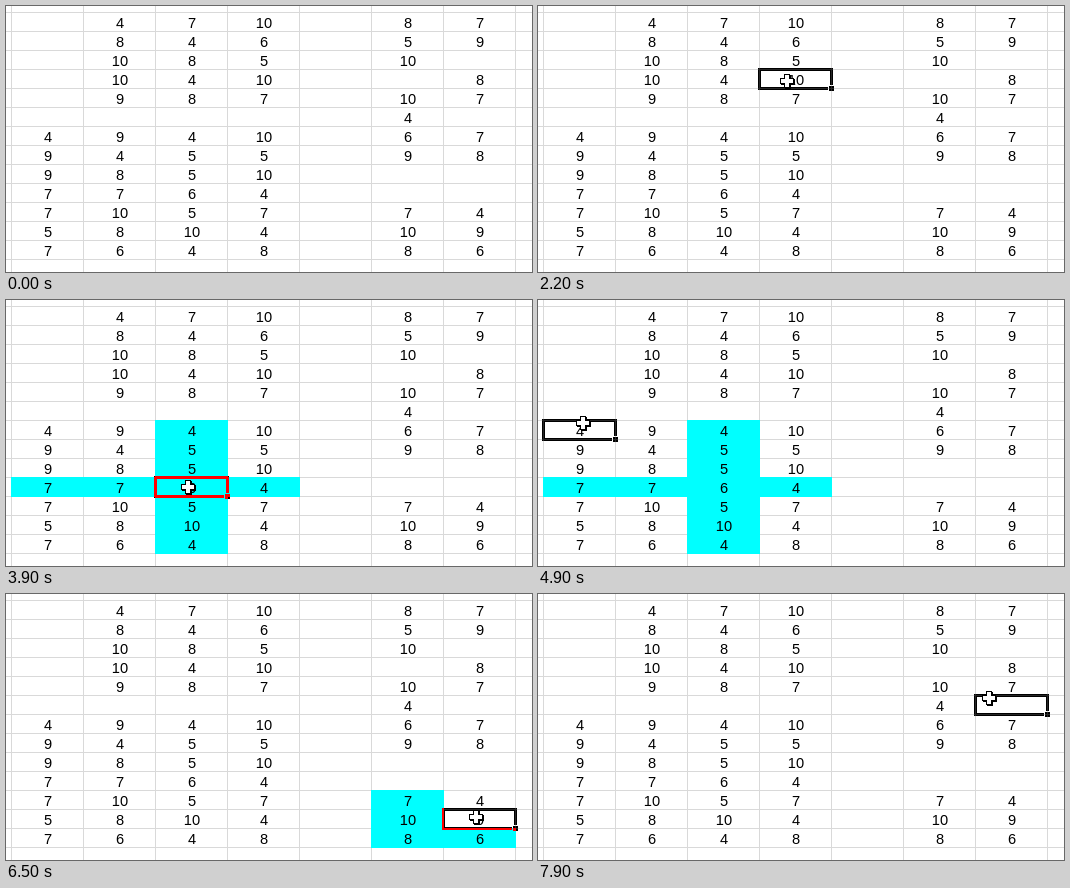
Recreate the animation shown at these times as an HTML page with a canvas. Size 526x266 px, loop 8000 ms.

```html
<!DOCTYPE html>
<html lang="en">
<head>
<meta charset="utf-8">
<title>Crosshair highlight in a sheet</title>
<style>
  html, body { margin: 0; width: 526px; height: 266px; overflow: hidden; background: #fff; }
  canvas { display: block; }
</style>
</head>
<body>
<canvas id="stage" width="526" height="266"></canvas>
<script>
const ctx = document.getElementById('stage').getContext('2d');
const LOOP = 8000, STEP = 100;

const rows = [
  ',4,7,10,,8,7', ',8,4,6,,5,9', ',10,8,5,,10,', ',10,4,10,,,8', ',9,8,7,,10,7',
  ',,,,,4,', '4,9,4,10,,6,7', '9,4,5,5,,9,8', '9,8,5,10,,,', '7,7,6,4,,,',
  '7,10,5,7,,7,4', '5,8,10,4,,10,9', '7,6,4,8,,8,6'
].map(line => line.split(','));

// Data blocks: first column, first row, last column, last row
const upper = [1, 0, 3, 4], lower = [0, 6, 3, 12], right = [5, 10, 6, 12];

// Clicks: time, column, row, block to highlight
const clicks = [
  [2200, 3, 3, upper], [3000, 2, 2, upper], [3800, 2, 9, lower], [4900, 0, 6, lower],
  [5900, 5, 12, right], [6500, 6, 11, right], [7800, 6, 5, null]
];

// Pointer path: time, x, y
const path = [
  [400, 520, 262], [800, 345, 140], [1100, 227, 67], [1300, 227, 67], [1700, 262, 87],
  [2000, 240, 64], [2200, 249, 75], [2300, 249, 75], [2600, 225, 129], [2900, 172, 64],
  [3100, 160, 52], [3200, 157, 46], [3700, 182, 187], [4000, 182, 187], [4300, 165, 201],
  [4800, 45, 123], [5200, 45, 123], [5700, 435, 239], [6000, 435, 239], [6200, 448, 250],
  [6500, 470, 223], [6600, 470, 223], [6700, 462, 216], [7200, 420, 160], [7600, 395, 106],
  [7900, 451, 104]
];

const colX = c => 5 + 72 * c;
const rowY = r => 6 + 19 * r;
const lastClick = t => clicks.filter(c => c[0] <= t).pop();

function box(color, x, y, w, h) {
  ctx.fillStyle = color;
  ctx.fillRect(x, y, w, h);
}

function drawGrid() {
  box('#fff', 0, 0, 526, 266);
  for (let c = 0; c < 8; c++) box('#d9d9d9', colX(c), 0, 1, 266);
  for (let r = 0; r < 14; r++) box('#d9d9d9', 0, rowY(r), 526, 1);
}

function fillCells(c0, r0, c1, r1) {
  box('#0ff', colX(c0), rowY(r0), 72 * (c1 - c0 + 1) + 1, 19 * (r1 - r0 + 1) + 1);
}

function drawCross([, c, r, block]) {
  if (!block) return;
  const [c0, r0, c1, r1] = block;
  fillCells(c, r0, c, r1);
  fillCells(c0, r, c1, r);
}

function drawNumbers() {
  ctx.font = '14.667px "Liberation Sans", Arial, sans-serif';
  ctx.textAlign = 'center';
  ctx.fillStyle = '#000';
  rows.forEach((row, r) => row.forEach((n, c) => ctx.fillText(n, colX(c) + 37, rowY(r) + 16)));
}

// The frame inverts what lies below: black on white, red on cyan
function drawSelection([, c, r]) {
  const x = colX(c), y = rowY(r);
  ctx.globalCompositeOperation = 'difference';
  box('#fff', x - 1, y - 1, 75, 3);
  box('#fff', x - 1, y + 2, 3, 16);
  box('#fff', x + 71, y + 2, 3, 14);
  box('#fff', x - 1, y + 18, 70, 3);
  box('#fff', x + 70, y + 17, 5, 5);
  ctx.globalCompositeOperation = 'source-over';
}

function plus(color, x, y, size, arm) {
  const gap = (size - arm) / 2;
  box(color, x + gap, y, arm, size);
  box(color, x, y + gap, size, arm);
}

function drawPlusPointer(x, y) {
  plus('#000', x - 6, y - 6, 14, 6);
  plus('#000', x - 7, y - 7, 14, 6);
  plus('#fff', x - 6, y - 6, 12, 4);
}

function shape(points, fill, stroke, width) {
  ctx.beginPath();
  points.forEach(([x, y]) => ctx.lineTo(x, y));
  ctx.closePath();
  ctx.lineWidth = width;
  ctx.strokeStyle = stroke;
  ctx.stroke();
  ctx.fillStyle = fill;
  ctx.fill();
}

function drawMovePointer(x, y) {
  ctx.save();
  ctx.translate(x + .5, y + .5);
  for (let i = 0; i < 4; i++) {
    shape([[-.5, 0], [-.5, -5], [-3, -5], [0, -8], [3, -5], [.5, -5], [.5, 0]], '#000', '#fff', 1.5);
    ctx.rotate(Math.PI / 2);
  }
  plus('#000', -5.5, -5.5, 11, 1);
  shape([[1, 1], [1, 15], [4, 12], [6.5, 18], [9, 17], [6.5, 11], [11, 11]], '#fff', '#000', 1.6);
  ctx.restore();
}

function pointerAt(t) {
  const i = path.findIndex(p => p[0] > t);
  if (i < 0) return path[path.length - 1].slice(1);
  const [t0, x0, y0] = path[i - 1], [t1, x1, y1] = path[i];
  const k = (t - t0) / (t1 - t0);
  return [Math.round(x0 + (x1 - x0) * k), Math.round(y0 + (y1 - y0) * k)];
}

function draw(now) {
  const t = Math.floor(now % LOOP / STEP) * STEP;
  const selected = lastClick(t), crossed = lastClick(t - STEP);
  drawGrid();
  if (crossed) drawCross(crossed);
  drawNumbers();
  if (selected) drawSelection(selected);
  if (t >= path[0][0]) {
    const drawPointer = t === 3200 ? drawMovePointer : drawPlusPointer;
    drawPointer(...pointerAt(t));
  }
}

const start = performance.now();
function tick() {
  draw(performance.now() - start);
  requestAnimationFrame(tick);
}
tick();
</script>
</body>
</html>
```
